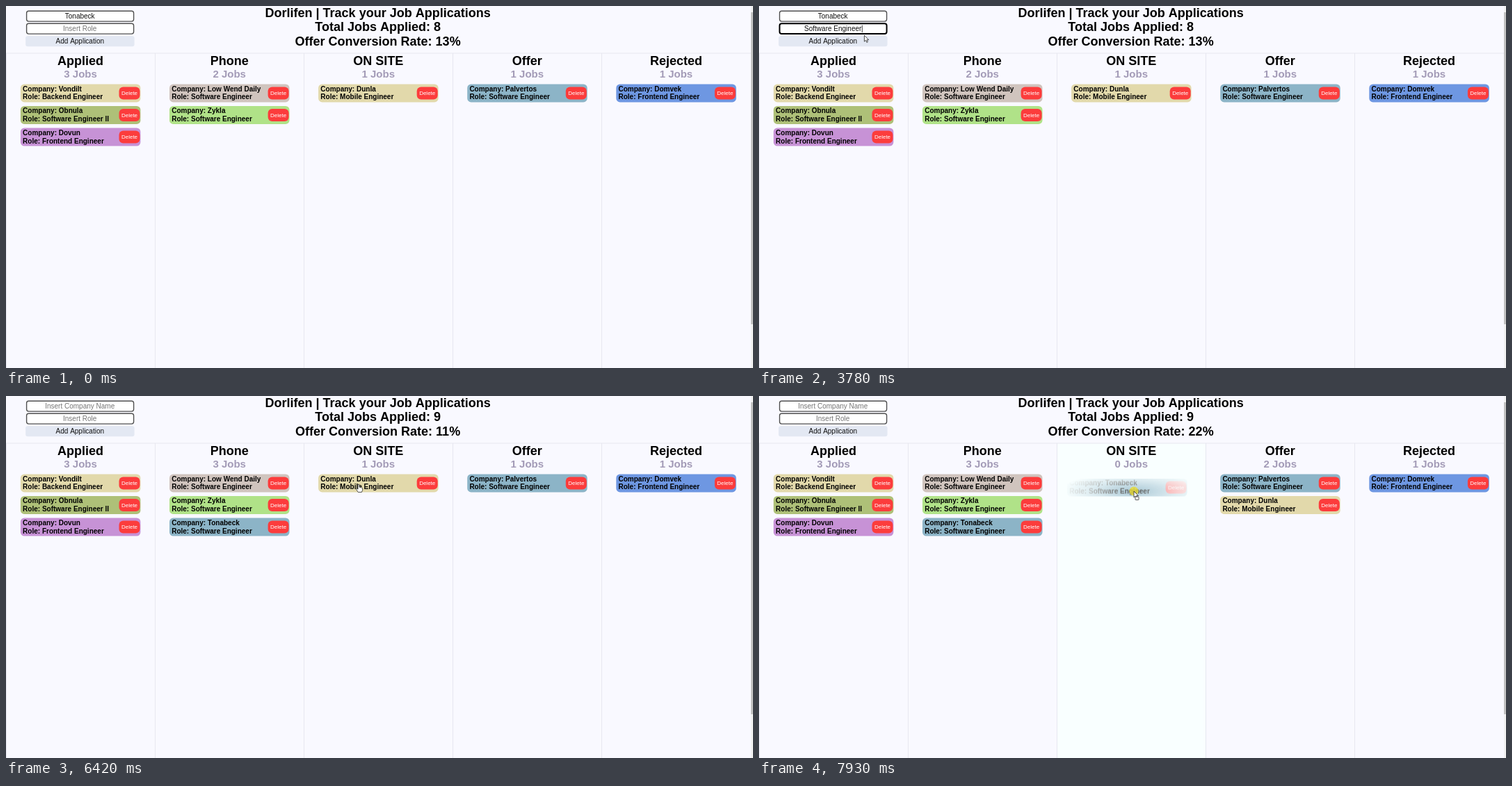
Write an HTML page with a canvas that moves like this. It is 1074 px wide and 521 px high and loops after 7.99 s.

```html
<!DOCTYPE html>
<html lang="en">
<head>
<meta charset="utf-8">
<title>Job board</title>
<style>
  html, body { margin: 0; width: 100%; height: 100%; overflow: hidden; background: #f9f9ff; }
  canvas { display: block; }
</style>
</head>
<body>
<canvas id="stage" width="1074" height="521"></canvas>
<script>
const LOOP = 7990, COL = 214.1, CARD_W = 172.5, CARD_H = 26;
const FONT = '"Liberation Sans", Arial, sans-serif';
const ctx = document.getElementById('stage').getContext('2d');
const ghost = document.createElement('canvas');
ghost.width = 174;
ghost.height = 27;
const ghostCtx = ghost.getContext('2d');

const card = (company, role, color) => ({ company, role: role + ' Engineer', color });
const added = card('Tonabeck', 'Software', '#8cb4c7');
const mobile = card('Dunla', 'Mobile', '#e2d9ab');
const columns = [
  ['Applied', [card('Vondilt', 'Backend', '#e2d9ab'),
               { ...card('Obnula', 'Software', '#aec078'), role: 'Software Engineer II' },
               card('Dovun', 'Frontend', '#c792d6')]],
  ['Phone', [card('Low Wend Daily', 'Software', '#d0c4be'), card('Zykla', 'Software', '#b0e288')]],
  ['ON SITE', [mobile]],
  ['Offer', [card('Palvertos', 'Software', '#8cb4c7')]],
  ['Rejected', [card('Domvek', 'Frontend', '#6e97e2')]]
];

// Pointer path: time, x, y
const path = [
  [30, 980, 505], [270, 193, 58], [410, 193, 58], [700, 157, 31], [3640, 157, 31],
  [3900, 147, 51], [4580, 147, 51], [4770, 172, 248], [4950, 172, 248], [5150, 99, 229],
  [5280, 99, 229], [5610, 297, 216], [5710, 310, 211], [5820, 310, 211], [6180, 488, 122],
  [6320, 488, 122], [6420, 507, 127], [6500, 507, 127], [6850, 747, 163], [7130, 747, 163],
  [7380, 331, 194], [7480, 331, 194], [7930, 539, 137]
];
const ADD = 4150;
const drags = [
  { item: added, press: 5170, start: 5280, drop: 5800, to: 1, dx: 78, dy: 22, settle: 100 },
  { item: mobile, press: 6440, start: 6500, drop: 6890, to: 3, dx: 58, dy: 15, settle: 240 },
  { item: added, press: 7400, start: 7480, drop: LOOP, to: 2, dx: 96, dy: 18.5, settle: 0 }
];
const clicks = [[840, 980], [4080, 4220], ...drags.map(d => [d.press, d.drop])];
const keyTimes = [1400, 1580, 1670, 1900, 2004, 2108, 2212, 2316, 2420,
                  2610, 2750, 2840, 2980, 3075, 3170, 3265, 3360];

const within = (t, a, b) => t >= a && t < b;

function pointerAt(t) {
  const i = path.findIndex(p => p[0] > t);
  if (i < 0) return path[path.length - 1].slice(1);
  const [t0, x0, y0] = path[i - 1], [t1, x1, y1] = path[i];
  const u = (t - t0) / (t1 - t0), e = u * u * (3 - 2 * u);
  return [x0 + (x1 - x0) * e, y0 + (y1 - y0) * e];
}

function boardAt(t) {
  const board = columns.map(c => [...c[1]]);
  if (t >= ADD) board[0].push(added);
  for (const { item, drop, to } of drags) {
    if (t < drop) continue;
    const from = board.find(list => list.includes(item));
    from.splice(from.indexOf(item), 1);
    board[to].push(item);
  }
  return board;
}

function text(c, str, x, y, size, color, align = 'center', weight = 'bold') {
  c.font = `${weight} ${size}px ${FONT}`;
  c.textAlign = align;
  c.fillStyle = color;
  c.fillText(str, x, y);
}

function box(c, x, y, w, h, r, fill, stroke, line) {
  c.beginPath();
  c.roundRect(x, y, w, h, r);
  if (fill) { c.fillStyle = fill; c.fill(); }
  if (stroke) { c.strokeStyle = stroke; c.lineWidth = line; c.stroke(); }
}

function drawCard(c, item, x, y) {
  box(c, x, y, CARD_W, CARD_H, 5.5, item.color);
  text(c, 'Company: ' + item.company, x + 3.2, y + 10.2, 10, '#000', 'left');
  text(c, 'Role: ' + item.role, x + 3.2, y + 22, 10, '#000', 'left');
  box(c, x + 141.6, y + 4.1, 30, 18, 6, '#fc3c3c');
  text(c, 'Delete', x + 156.6, y + 15.9, 8, '#fff', 'center', 'normal');
}

function drawField(y, value, placeholder, focused) {
  box(ctx, 29.6, y, 154, 14.8, 3, '#fff', focused ? '#000' : '#505050', focused ? 2 : 1.4);
  text(ctx, value || placeholder, 106.2, y + 10.8, 10, value ? '#111' : '#757575', 'center', 'normal');
  if (focused && value) {
    ctx.fillRect(106.7 + ctx.measureText(value).width / 2, y + 2.3, 0.8, 10.5);
  }
}

function drawForm(t, overButton) {
  const sent = t >= ADD, typed = keyTimes.filter(k => k <= t).length;
  drawField(7.3, sent ? '' : added.company, 'Insert Company Name', false);
  drawField(25.3, sent ? '' : added.role.slice(0, typed), 'Insert Role', within(t, 840, 4080));
  const focused = within(t, 4080, 5170);
  box(ctx, 28.2, 43.3, 156.4, 15, 3, '#e3e8f3', focused && '#101018', 1.5);
  text(ctx, 'Add Application', 106.3, 54, 10, overButton ? '#f01818' : '#111', 'center', 'normal');
}

function drawGhost({ item, dx, dy }, x, y) {
  const g = ghostCtx;
  g.clearRect(0, 0, 174, 27);
  drawCard(g, item, 0, 0);
  g.save();
  g.globalCompositeOperation = 'destination-in';
  g.translate(dx, dy);
  g.scale(1, 0.27);
  const fade = g.createRadialGradient(0, 0, 0, 0, 0, 105);
  fade.addColorStop(0, 'rgba(0,0,0,.7)');
  fade.addColorStop(0.3, 'rgba(0,0,0,.48)');
  fade.addColorStop(0.6, 'rgba(0,0,0,.24)');
  fade.addColorStop(1, 'rgba(0,0,0,0)');
  g.fillStyle = fade;
  g.fillRect(-200, -400, 400, 800);
  g.restore();
  ctx.drawImage(ghost, x - dx, y - dy);
}

const shapes = {
  arrow: new Path2D('M0 0V9L2.1 7.1L3.5 10.3L5 9.6L3.6 6.6H6.4Z'),
  hand: new Path2D('M-1 .8Q0-.6 1 .8V4.2Q2 3.6 2.8 4.6Q3.8 4.2 4.4 5.2Q5.6 5 5.6 6.4V8.4L4.4 11.4H-.8L-3.4 7.4Q-3.6 6-2.2 6.2L-1 7.2Z'),
  beam: new Path2D('M-2-4H-.5L0-3.5L.5-4H2M0-3.5V3.5M-2 4H-.5L0 3.5L.5 4H2')
};

function drawPointer(kind, x, y, dragging) {
  ctx.save();
  ctx.translate(x, y);
  ctx.lineWidth = 0.8;
  ctx.strokeStyle = '#222';
  ctx.fillStyle = '#fff';
  if (kind !== 'beam') ctx.fill(shapes[kind]);
  ctx.stroke(shapes[kind]);
  if (dragging) box(ctx, 2, 8, 5, 4.5, 0.5, '#fff', '#444', 0.9);
  ctx.restore();
}

function draw(t) {
  const board = boardAt(t);
  const [x, y] = t < 30 ? [-99, -99] : pointerAt(t);
  const drag = drags.find(d => within(t, d.start, d.drop));
  const tinted = drags.some(d => within(t, d.start, d.drop + d.settle)) ? Math.floor(x / COL) : -1;
  const total = board.flat().length;
  let overCard = false;

  ctx.fillStyle = '#f9f9ff';
  ctx.fillRect(0, 0, 1074, 521);

  const title = ['Dorlifen | Track your Job Applications', 'Total Jobs Applied: ' + total,
    `Offer Conversion Rate: ${Math.round(board[3].length / total * 100)}%`];
  title.forEach((line, i) => text(ctx, line, 534.6, 15.8 + i * 20.6, 18, '#000'));

  drawForm(t, x > 28 && x < 185 && y > 43 && y < 59);

  board.forEach((list, i) => {
    const left = i * COL, mid = left + COL / 2;
    if (i === tinted) {
      ctx.fillStyle = '#f9ffff';
      ctx.fillRect(Math.floor(left), 68, 214, 453);
    }
    ctx.fillStyle = '#e7e7f0';
    ctx.fillRect(Math.floor(left), 68, 1, 453);
    text(ctx, columns[i][0], mid, 85, 18, '#000');
    text(ctx, list.length + ' Jobs', mid, 102.9, 15, '#a39bb7');
    list.forEach((item, row) => {
      const cx = left + 20.9, cy = 112.4 + row * 31.55;
      drawCard(ctx, item, cx, cy);
      overCard ||= x > cx && x < cx + CARD_W && y > cy && y < cy + CARD_H;
    });
  });
  ctx.fillStyle = '#e7e7f0';
  ctx.fillRect(0, 67.5, 1071, 1);

  ctx.fillStyle = '#f1f1f1';
  ctx.fillRect(1071, 0, 3, 521);
  ctx.fillStyle = '#c1c1c1';
  ctx.fillRect(1071, 9, 3, 449);

  if (drag) drawGhost(drag, x, y);
  if (clicks.some(([a, b]) => within(t, a, b))) {
    ctx.fillStyle = 'rgba(236,220,40,.75)';
    ctx.beginPath();
    ctx.arc(x, y, 6.5, 0, 7);
    ctx.fill();
  }
  const overField = x > 29 && x < 184 && y > 7 && y < 41;
  drawPointer(drag ? 'arrow' : overField ? 'beam' : overCard ? 'hand' : 'arrow', x, y, drag);
}

let begin;
function tick(now) {
  begin ??= now;
  draw((now - begin) % LOOP);
  requestAnimationFrame(tick);
}
requestAnimationFrame(tick);
</script>
</body>
</html>
```
